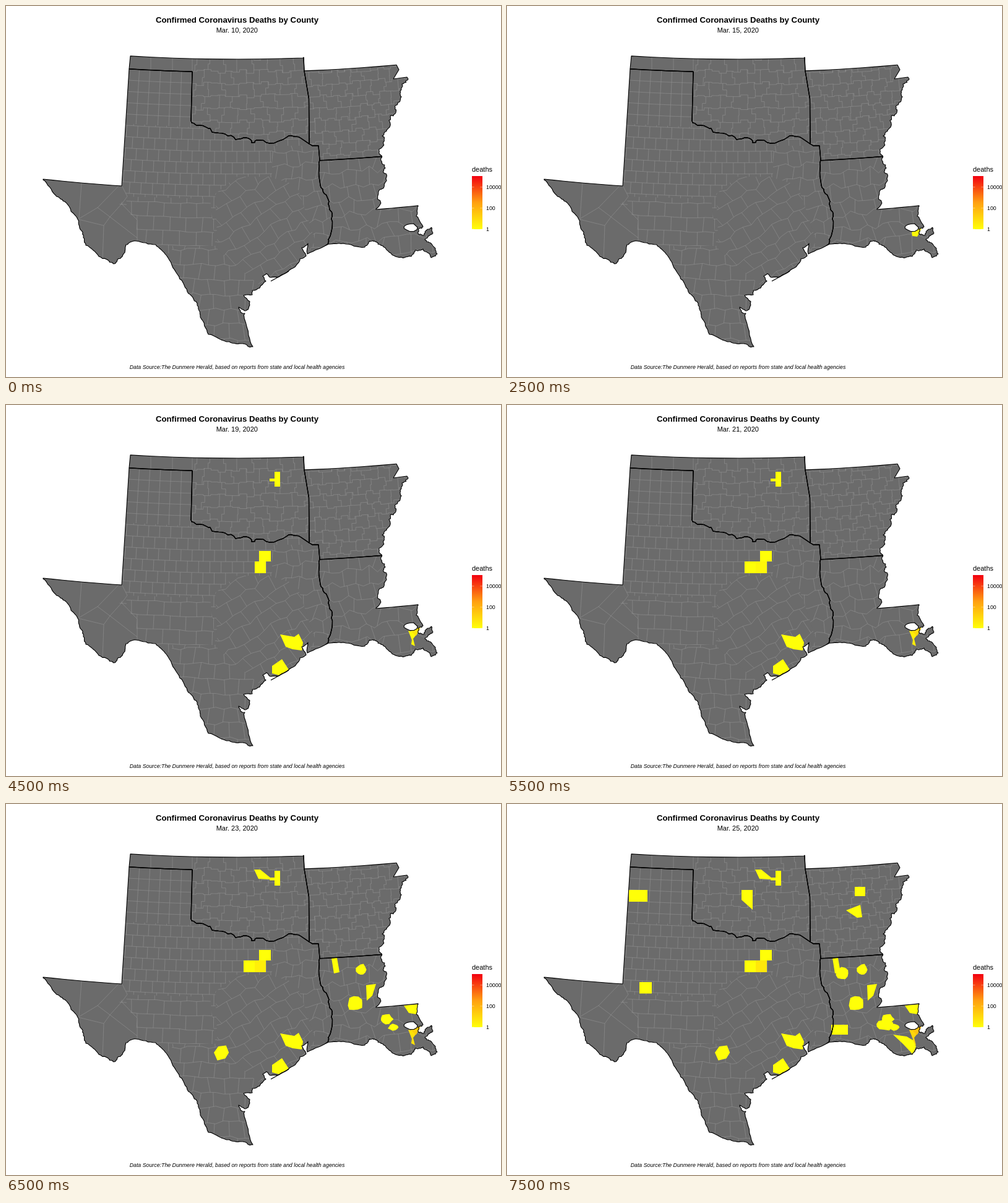
Animation of 800x600 px, one loop 8 s. Source, as an HTML page with a canvas:

```html
<!DOCTYPE html>
<html lang="en">
<head>
<meta charset="utf-8">
<title>Confirmed Coronavirus Deaths by County</title>
<style>
html, body { margin: 0; width: 100%; height: 100%; overflow: hidden; background: #fff; }
canvas { display: block; width: 800px; height: 600px; }
</style>
</head>
<body>
<canvas id="stage" width="800" height="600"></canvas>
<script>
const W = 800, H = 600, DAY = 500, DAYS = 16;
const LAND = '#6b6b6b', COUNTY = '#999';
const FONT = '"Liberation Sans", Arial, sans-serif';
const ctx = document.getElementById('stage').getContext('2d');

const pts = s => s.trim().split(/\s+/).map(p => p.split(',').map(Number));
const rev = a => a.slice().reverse();
const noise = (a, b, c) => {
  const n = Math.sin(a * 127.1 + b * 311.7 + c * 74.7) * 43758.5453;
  return (n - Math.floor(n)) * 2 - 1;
};

function trace(list, closed = true) {
  const path = new Path2D();
  list.forEach(([x, y], i) => i ? path.lineTo(x, y) : path.moveTo(x, y));
  if (closed) path.closePath();
  return path;
}

// Map projection: bowed parallels and leaning meridians.
const bow = x => 1.75e-4 * (x - 372) ** 2;
function warp(u, v) {
  const x = 372 + (u - 372) * (1 + (v - 102) * 4e-4);
  return [x, v - bow(x)];
}
function parallel(v, from, to) {
  return Array.from({ length: 9 }, (_, i) => {
    const x = from + (to - from) * i / 8;
    return [x, v - bow(x)];
  });
}

// Midpoint displacement turns a few key points into a winding river or shore.
function winding(list, amp, depth, seed) {
  if (!depth) return list;
  const out = [list[0]];
  for (let i = 1; i < list.length; i++) {
    const [ax, ay] = list[i - 1], [bx, by] = list[i];
    const len = Math.hypot(bx - ax, by - ay) || 1;
    const d = Math.min(amp, len / 3) * noise(i, seed, depth);
    out.push([(ax + bx) / 2 - (by - ay) / len * d, (ay + by) / 2 + (bx - ax) / len * d], list[i]);
  }
  return winding(out, amp * 0.75, depth - 1, seed + 1);
}

// Borders
const redRiver = winding(pts(`299,186 308,193 327,198 333,204 354,207 371,216 388,213 397,221 405,217 426,222
 454,212 466,211 490,223`), 2.5, 2, 3);
const mississippi = winding(pts('650,118 637,138 632,160 619,185 608,210 606,230 607,245'), 5, 4, 7);
const lowerRiver = winding(pts('607,245 613,262 614,279 602,300 598,328'), 5, 3, 12);
const sabine = winding(pts('507,249 508,290 522,316 527,335 524,372 517,387'), 2, 3, 5);
const corner = pts('490,223 495,226 505,226 507,249');
const rioGrande = winding(pts(`60,281 80,306 97,318 116,345 124,366 129,387 150,405 174,417 188,405 194,386 210,380
 242,386 259,403 277,434 293,462 309,481 314,503 327,531 361,543 383,546 399,551`), 1.8, 3, 9);
const texasCoast = winding(pts(`399,551 392,533 385,505 386,497 379,495 376,487 386,493 392,489 394,478 384,468
 398,467 398,460 410,456 420,445 415,437 421,433 428,439 441,438 457,428 470,418 475,409 485,404 478,391 488,384
 487,401 505,393 517,387`), 1.2, 2, 4);
const delta = winding(pts(`666,324 663,340 674,357 666,361 668,370 676,370 679,363 687,358 690,367 677,378 690,388
 697,401 687,407 674,393 661,395 655,405 633,406 613,391 601,385 595,380 586,382 580,390 545,384 517,387`), 1.8, 3, 2);
const okEast = pts('481,83 482,105 489.5,150 490,223');
const panhandle = [...parallel(107, 199, 301), [299, 186]];
const south = parallel(253, 507, 607);

const texas = trace([...panhandle, ...redRiver, ...corner, ...sabine, ...rev(texasCoast), ...rev(rioGrande),
  ...parallel(297, 60, 187)]);
const oklahoma = trace([...parallel(86, 201, 480), ...okEast, ...rev(redRiver), ...rev(panhandle)]);
const arkansas = trace([...parallel(107, 482, 631), ...pts('635,103 626,118 648,115'), ...mississippi,
  ...rev(south), ...rev(corner), ...rev(okEast.slice(1))]);
const louisiana = trace([...south, ...lowerRiver, ...parallel(338, 598, 666), ...delta, ...rev(sabine)]);
const states = [texas, oklahoma, arkansas, louisiana];

const box = (x, y, w, h) => trace([[x, y], [x + w, y], [x + w, y + h], [x, y + h]]);
function blob(x, y, rx, ry, n = 11) {
  return trace(Array.from({ length: n }, (_, i) => {
    const a = i / n * Math.PI * 2, r = 1 + 0.17 * noise(i, x, y);
    return [x + rx * r * Math.cos(a), y + ry * r * Math.sin(a)];
  }));
}
const lake = blob(654, 358, 11, 6.5);

// Brick-like net of county lines inside one part of a state.
function net(g, state, area, o) {
  const { x, y, dx, dy, turn = 0, shift = 0.4, jit = 0, step = false, seed = 1 } = o;
  const c = Math.cos(turn), s = Math.sin(turn);
  const at = (a, b) => warp(x + a * c - b * s, y + a * s + b * c);
  const level = (r, a) => {
    const k = a / dx * 2, i = Math.floor(k), f = step ? 0 : k - i;
    return r * dy + jit * (noise(i, r, seed) * (1 - f) + noise(i + 1, r, seed) * f);
  };
  g.save();
  g.clip(state);
  if (area) {
    const region = trace(pts(area));
    g.clip(region);
    g.fill(region);
  }
  g.beginPath();
  for (let r = -26; r <= 26; r++) {
    for (let i = -50; i <= 50; i++) {
      const a = i * dx / 2 + 0.01, b = a + dx / 2 - 0.02;
      g[i > -50 ? 'lineTo' : 'moveTo'](...at(a, level(r, a)));
      g.lineTo(...at(b, level(r, b)));
    }
    for (let j = -25; j <= 25; j++) {
      const left = (j + (r & 1 ? shift : 0)) * dx;
      const a = left + jit * noise(j, r, seed + 5), b = left + jit * noise(j, r, seed + 9);
      const top = level(r, a), end = level(r + 1, b), mid = (top + end) / 2;
      g.moveTo(...at(a, top));
      if (step) {
        g.lineTo(...at(a, mid));
        g.lineTo(...at(b, mid));
      }
      g.lineTo(...at(b, end));
    }
  }
  g.stroke();
  g.restore();
}

function layer(draw) {
  const c = document.createElement('canvas');
  c.width = W;
  c.height = H;
  const g = c.getContext('2d');
  g.lineJoin = 'round';
  draw(g);
  return c;
}

const base = layer(g => {
  g.fillStyle = LAND;
  states.forEach(s => g.fill(s));
  g.strokeStyle = COUNTY;
  g.lineWidth = 0.5;
  net(g, texas, '', { x: 383.3, y: 107, dx: 17.1, dy: 18.3 });
  net(g, texas, '180,90 302,90 300,196 190,190', { x: 301, y: 107, dx: 17, dy: 18.3, shift: 0 });
  net(g, texas, '194,308 330,312 340,400 200,400', { x: 289, y: 320, dx: 24, dy: 23, jit: 1, seed: 2 });
  net(g, texas, '268,388 345,388 418,455 420,560 270,560', { x: 312, y: 395, dx: 21, dy: 24, jit: 2.5, seed: 3 });
  net(g, texas, '430,226 508,226 535,400 485,400 430,274', { x: 446, y: 236, dx: 21, dy: 23, jit: 5, seed: 4 });
  net(g, texas, '338,304 372,276 425,276 470,290 500,380 470,425 415,456 342,395',
    { x: 402, y: 345, dx: 25, dy: 22, turn: -0.58, jit: 3.5, seed: 5 });
  net(g, oklahoma, '299,80 500,80 500,240 299,240', { x: 320, y: 106, dx: 23, dy: 20, jit: 3.5, step: true, seed: 6 });
  net(g, arkansas, '', { x: 505, y: 130, dx: 21, dy: 19, jit: 3.5, step: true, seed: 7 });
  net(g, louisiana, '', { x: 528, y: 273, dx: 23, dy: 23, jit: 6, seed: 8 });
  [234, 269, 301].forEach(x => g.stroke(trace([[x, 86 - bow(x)], [x, 107 - bow(x)]], false)));

  // The large western counties
  g.clip(texas);
  g.fill(trace(pts('50,270 187,290 196,308 182,322 212,346 205,430 40,430')));
  ['122,286 118,344 148,326 182,291', '117,345 158,355 168,341 148,326', '212,375 168,341 187,320 196,308 187,290',
    '158,355 156,412', '187,320 212,346 212,380'].forEach(s => g.stroke(trace(pts(s), false)));
});

const borders = layer(g => {
  g.fillStyle = '#fff';
  g.fill(lake);
  g.strokeStyle = '#000';
  g.lineWidth = 1.1;
  [...states, lake].forEach(s => g.stroke(s));
  g.lineWidth = 1.4;
  const island = pts('428,445 457,429');
  [redRiver, corner, sabine, panhandle, okEast, south, island].forEach(l => g.stroke(trace(l, false)));
});

// Legend colours on a log scale from 1 to 100000 deaths.
const RAMP = [[255, 255, 8], [255, 160, 16], [242, 0, 16]];
function tint(deaths) {
  const k = Math.min(Math.log10(deaths) / 5, 0.999) * 2, i = Math.floor(k);
  return `rgb(${RAMP[i].map((c, n) => Math.round(c + (RAMP[i + 1][n] - c) * (k - i)))})`;
}
const ramp = ctx.createLinearGradient(0, 361, 0, 275);
RAMP.forEach((c, i) => ramp.addColorStop(i / 2, `rgb(${c})`));

// Each county starts with one death on a day, then grows by a daily factor.
const counties = [];
const county = (path, day, growth = 1) => counties.push({ path, day, growth });

// Louisiana
county(trace(pts('654,366 664,361 670,360 663,373 655,372')), 4, 1.39);
county(trace(pts('650,365 655,366 662,373 658,378 661,390 655,387 656,380')), 8, 1.43);
county(blob(564, 323, 13, 12), 13);
county(blob(574, 268, 8, 9), 13);
county(trace(pts('582,293 598,291 592,310 583,318')), 12);
county(trace(pts('526,249 535,249 539,272 530,274')), 13);
county(trace(pts('643,326 666,324 663,340 651,338')), 13);
county(blob(615, 348, 10, 8), 12);
county(blob(626, 361, 8, 6), 12);
county(blob(611, 358, 14, 8), 14);
county(blob(542, 274, 11, 10), 14);
county(box(524, 357, 27, 16), 15);
county(trace(pts('624,373 646,376 656,382 661,392 656,405 640,388')), 15);
// Texas
county(trace(pts('430,422 446,411 457,428 441,437 430,434')), 6);
county(trace(pts('443,371 466,375 473,370 480,384 478,397 463,395 452,391')), 9);
county(box(409, 236, 19, 17), 8);
county(box(402, 253, 18, 19), 9, 1.28);
county(box(384, 253, 18, 19), 10);
county(blob(349, 402, 13, 13, 6), 12);
county(box(214, 288, 20, 18.5), 14);
county(box(197, 139, 30, 19), 15);
// Oklahoma and Arkansas
county(box(434, 108, 9, 24), 9);
county(box(426, 119, 9, 4.5), 9);
county(trace(pts('401,106 411,106 427,119 427,122 408,121')), 13);
county(trace(pts('379,139 397,139 397,171 379,155')), 15);
county(box(562, 134, 17, 15), 14);
county(trace(pts('548,172 571,163 574,183 566,184')), 14);

function text(s, x, y, font, align = 'left') {
  ctx.font = `${font} ${FONT}`;
  ctx.textAlign = align;
  ctx.fillStyle = '#000';
  ctx.fillText(s, x, y);
}

function legend() {
  text('deaths', 753, 268, '11px');
  ctx.fillStyle = ramp;
  ctx.fillRect(753, 275, 17, 86);
  [1, 100, 10000].forEach((n, i) => {
    const y = 361 - 34 * i;
    ctx.fillStyle = 'rgba(255,255,255,.5)';
    ctx.fillRect(753, y - 0.5, 3.5, 0.8);
    ctx.fillRect(766.5, y - 0.5, 3.5, 0.8);
    text(String(n), 776, y + 3, '8.8px');
  });
}

function frame(now) {
  const today = Math.floor(now / DAY) % DAYS;
  ctx.fillStyle = '#fff';
  ctx.fillRect(0, 0, W, H);
  ctx.drawImage(base, 0, 0);
  counties.filter(c => c.day <= today).forEach(({ path, day, growth }) => {
    ctx.fillStyle = tint(growth ** (today - day));
    ctx.fill(path);
  });
  ctx.drawImage(borders, 0, 0);
  text('Confirmed Coronavirus Deaths by County', 373.5, 27, 'bold 13.2px', 'center');
  text(`Mar. ${10 + today}, 2020`, 373.3, 43, '11px', 'center');
  text('Data Source:The Dunmere Herald, based on reports from state and local health agencies',
    373.5, 587, 'italic 8.8px', 'center');
  legend();
}

const start = performance.now();
function loop() {
  frame(performance.now() - start);
  requestAnimationFrame(loop);
}
loop();
</script>
</body>
</html>
```
